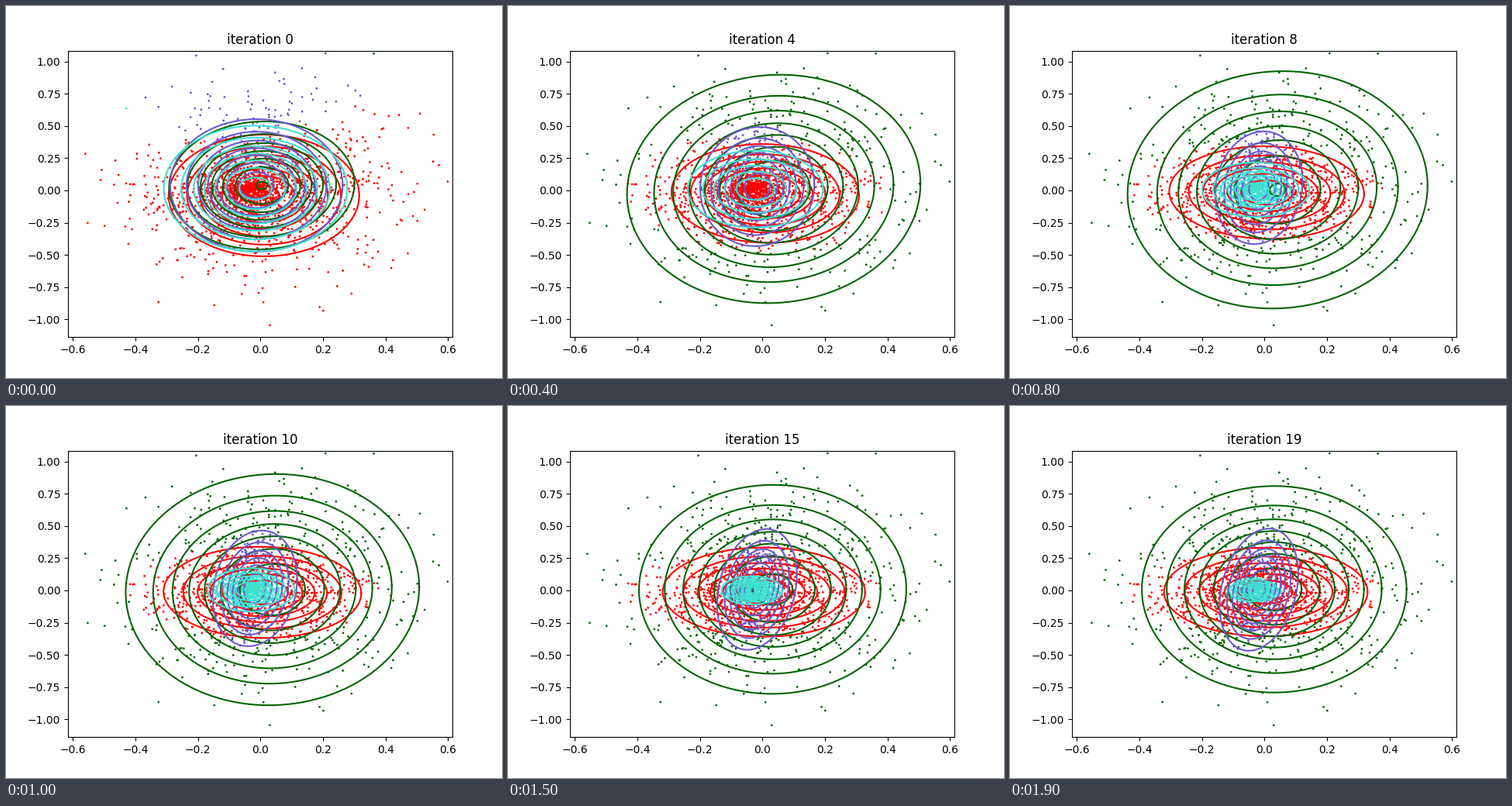
A matplotlib script that plays this animation: 640 px wide and 480 px high, repeating every 2 s.

```python
import numpy as np
import matplotlib.pyplot as plt
from matplotlib.animation import FuncAnimation
from matplotlib.colors import to_rgba_array
from matplotlib.ticker import MaxNLocator

STEPS = 20
TURN = 6      # iteration at which the clusters have separated
POINTS = 1800

# mean x, mean y, sigma x, sigma y, correlation: at the start, the turn, the end
POSES = {
    "red": [(.011, -.039, .1525, .236, 0),
            (.008, -.018, .156, .186, -.04),
            (.004, -.012, .166, .175, 0)],
    "darkgreen": [(.004, .039, .150, .251, .03),
                  (.046, .003, .256, .493, .05),
                  (.031, .009, .210, .397, 0)],
    "slateblue": [(-.013, .039, .137, .255, 0),
                  (-.018, .027, .0754, .220, .05),
                  (-.018, .006, .063, .237, .26)],
    "turquoise": [(-.016, .015, .1465, .243, 0),
                  (-.025, .009, .106, .133, 0),
                  (-.035, 0, .042, .046, 0)],
}
WEIGHTS = np.array([(.45, .09, .21, .23), (.36, .32, .13, .23)])
RGBA = to_rgba_array(list(POSES))


def ease_out(t, power):
    return 1 - (1 - t)**power


def mix(a, b, t):
    return np.asarray(a) + (np.asarray(b) - np.asarray(a)) * t


def pose(color, i):
    start, turn, end = POSES[color]
    if i < TURN:
        return mix(start, turn, ease_out(i / TURN, 1.3))
    return mix(turn, end, ease_out((i - TURN) / (STEPS - 1 - TURN), 2))


def weights(i):
    return mix(*WEIGHTS, ease_out(i / (STEPS - 1), 2))


def make_points():
    rng = np.random.default_rng(7)
    parts = []
    for color, w in zip(POSES, weights(STEPS - 1)):
        mx, my, sx, sy, rho = pose(color, STEPS - 1)
        cov = [[sx**2, rho * sx * sy], [rho * sx * sy, sy**2]]
        parts.append(rng.multivariate_normal((mx, my), cov, int(POINTS * w)))
    return np.vstack(parts)


def peak(sx, sy, rho):
    return 1 / (2 * np.pi * sx * sy * np.sqrt(1 - rho**2))


def log_density(pts, mx, my, sx, sy, rho):
    u, v = (pts[:, 0] - mx) / sx, (pts[:, 1] - my) / sy
    q = (u * u - 2 * rho * u * v + v * v) / (1 - rho**2)
    return np.log(peak(sx, sy, rho)) - q / 2


def rings(mx, my, sx, sy, rho):
    """Contours of the density at evenly spaced round levels."""
    top = peak(sx, sy, rho)
    levels = MaxNLocator(8).tick_values(0, top)
    levels = levels[(levels > 0) & (levels < top)]
    r = np.sqrt(2 * np.log(top / levels))[:, None]
    t = np.append(np.linspace(0, 2 * np.pi, 121), np.nan)
    x = mx + r * sx * np.cos(t)
    y = my + r * sy * np.sin(t + np.arcsin(rho))
    return x.ravel(), y.ravel()


points = make_points()

fig, ax = plt.subplots(figsize=(6.4, 4.8), dpi=100)
ax.set_xlim(-.6159, .6139)
ax.set_ylim(-1.137, 1.084)
title = ax.set_title("iteration 0")
dots = ax.scatter(*points.T, s=1, zorder=1)
curves = [ax.plot([], [], color=c, lw=1.5, zorder=2)[0] for c in POSES]


def update(i):
    poses = [pose(c, i) for c in POSES]
    scores = [np.log(w) + log_density(points, *p)
              for w, p in zip(weights(i), poses)]
    dots.set_color(RGBA[np.argmax(scores, axis=0)])
    for curve, p in zip(curves, poses):
        curve.set_data(*rings(*p))
    title.set_text(f"iteration {i}")
    return [dots, title, *curves]


anim = FuncAnimation(fig, update, frames=STEPS, interval=100,
                     init_func=lambda: update(0), repeat=True, repeat_delay=0)
plt.show()
```
